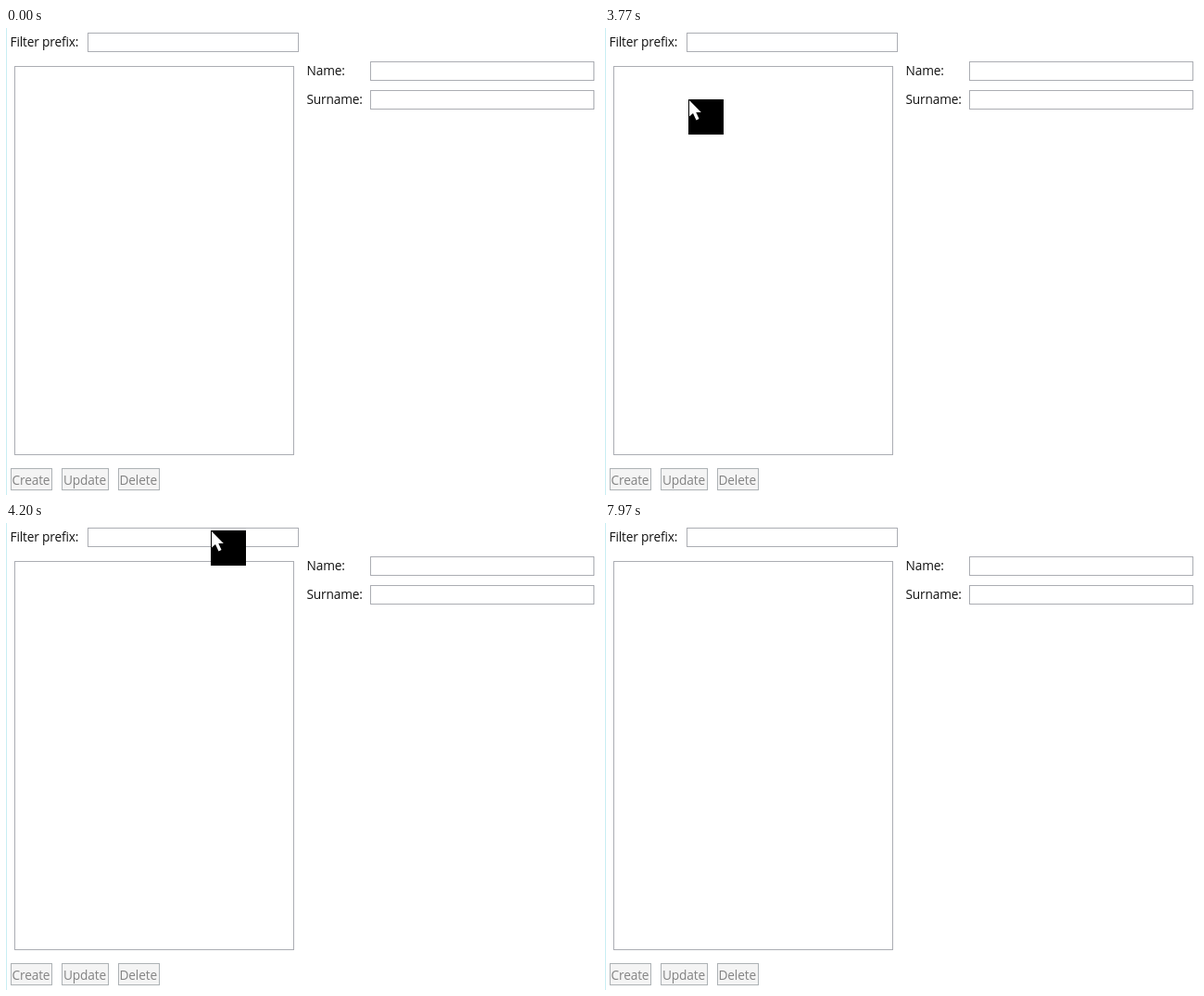
Write an HTML page that moves like this. It is 640x504 px and loops after 8000 ms.

```html
<!DOCTYPE html>
<html lang="en">
<head>
<meta charset="utf-8">
<title>Filter form</title>
<style>
html, body { margin: 0; width: 100%; height: 100%; overflow: hidden; background: #fff; }
svg { display: block; }
text { font: 13.7px "Open Sans", "Noto Sans", sans-serif; letter-spacing: -.15px; fill: #111; }
.field { fill: #fff; stroke: #abadb3; }
.button rect { fill: #f4f4f4; stroke: #adb2b5; }
.button text { fill: #838383; }
</style>
</head>
<body>
<svg width="640" height="504" viewBox="0 0 640 504">
  <rect width="1" height="504" fill="#c9eef3"/>
  <text x="4.5" y="20">Filter prefix:</text>
  <text x="324.5" y="51">Name:</text>
  <text x="324.5" y="82">Surname:</text>
  <g class="field">
    <rect x="88.5" y="5.5" width="227" height="20"/>
    <rect x="393.5" y="36.5" width="241" height="20"/>
    <rect x="393.5" y="67.5" width="241" height="20"/>
    <rect x="9.5" y="41.5" width="301" height="419"/>
  </g>
  <g class="button">
    <rect x="5.5" y="475.5" width="44" height="23"/>
    <text x="6.5" y="493">Create</text>
    <rect x="60.5" y="475.5" width="50" height="23"/>
    <text x="62" y="493">Update</text>
    <rect x="121.5" y="475.5" width="44" height="23"/>
    <text x="122.5" y="493">Delete</text>
  </g>
  <g id="pointer" visibility="hidden">
    <rect width="38" height="38"/>
    <path d="M1 1V18.5L5 15L8.5 22.5L11.5 21L8.3 14H13.8Z" fill="#fff"/>
  </g>
</svg>
<script>
const LOOP = 8000, HIDE = 7110;
// time, x, y
const path = [[3770, 90, 77], [3970, 342, 61], [4200, 221, 8], [4440, 217, 20]];
const pointer = document.getElementById("pointer");
const smooth = u => u * u * (3 - 2 * u);

function position(t) {
  const next = path.findIndex(p => p[0] > t);
  if (next < 0) return path[path.length - 1].slice(1);
  const [t0, x0, y0] = path[next - 1], [t1, x1, y1] = path[next];
  const u = smooth((t - t0) / (t1 - t0));
  return [x0 + (x1 - x0) * u, y0 + (y1 - y0) * u].map(Math.round);
}

const start = performance.now();
function draw() {
  const t = (performance.now() - start) % LOOP;
  const visible = t >= path[0][0] && t < HIDE;
  pointer.setAttribute("visibility", visible ? "visible" : "hidden");
  if (visible) pointer.setAttribute("transform", `translate(${position(t)})`);
  requestAnimationFrame(draw);
}
draw();
</script>
</body>
</html>
```
